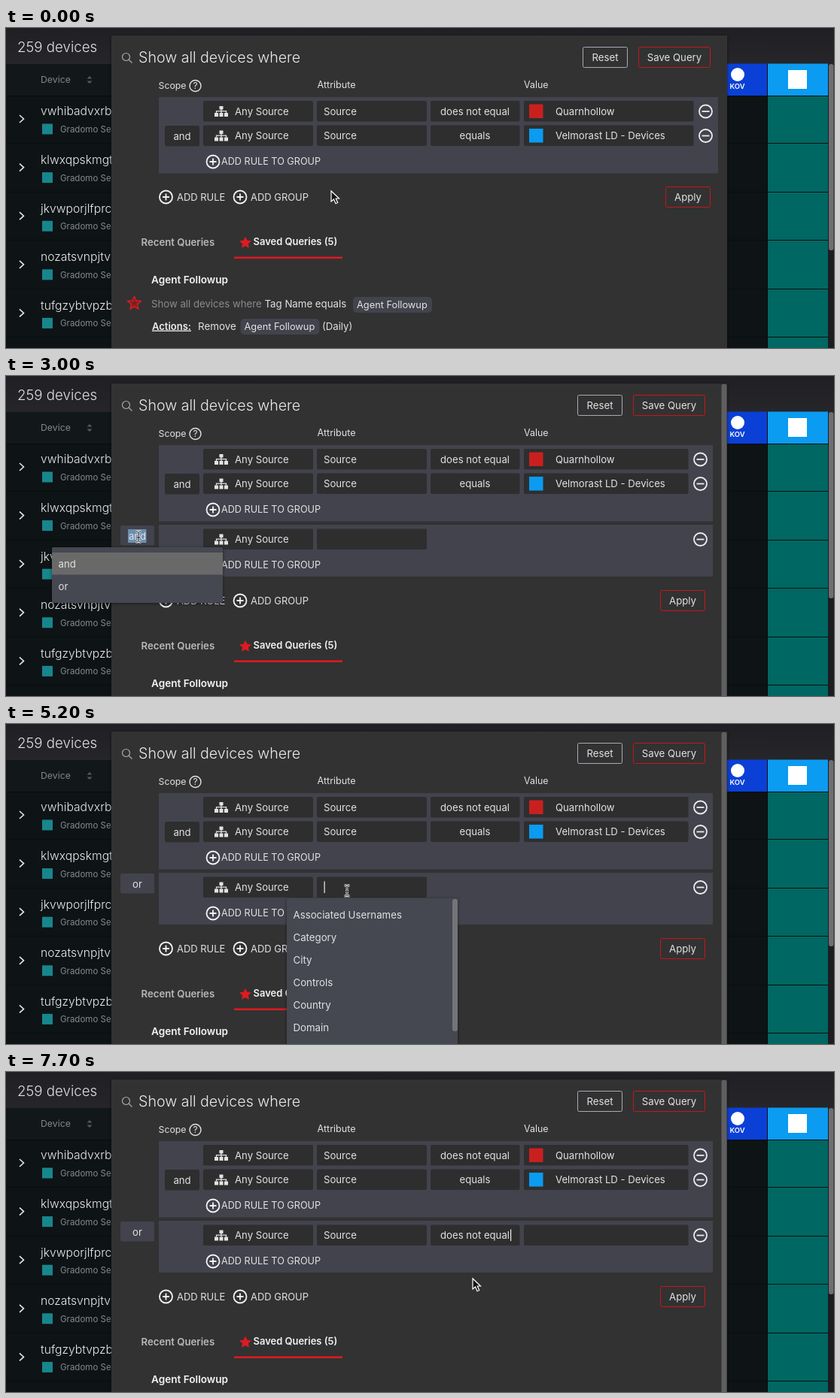
Animation, 1100 px wide and 426 px high, one loop 8 s. Source, as an HTML page:

```html
<!DOCTYPE html>
<html lang="en">
<head>
<meta charset="utf-8">
<title>Device query builder</title>
<style>
html, body { margin: 0; width: 100%; height: 100%; overflow: hidden; background: #0e1315; }
svg { display: block; width: 1100px; height: 426px; font-family: Inter, "Open Sans", sans-serif; }
text { white-space: pre; }
</style>
</head>
<body>
<svg id="stage" viewBox="0 0 1100 426"></svg>
<script>
const LOOP = 8000;
const GREY = '#42434d', FIELD = '#2e2e2f', LIGHT = '#e2e2e4', RED = '#c5161d';

// Each step holds until the next: time, cursor [shape, x, y], changes to the form
const steps = [
  [0, ['arrow', 432, 217], { group: false, hover: false, join: 'and', menu: '', attr: '', op: null, value: false, caret: '' }],
  [500, ['arrow', 412, 220], {}],
  [700, ['hand', 391, 232], { hover: true }],
  [1200, ['arrow', 389, 224], { hover: false, group: true }],
  [1400, ['arrow', 372, 222], {}],
  [1900, ['beam', 335, 217], {}],
  [2100, ['arrow', 254, 212], {}],
  [2300, ['arrow', 200, 210], {}],
  [2500, ['beam', 176, 214], {}],
  [3000, ['beam', 176, 214], { menu: 'join' }],
  [3500, ['hand', 177, 262], {}],
  [3700, ['hand', 178, 291], { menu: 'joinOr' }],
  [4200, ['arrow', 176, 283], { menu: '', join: 'or' }],
  [4700, ['arrow', 372, 230], {}],
  [5200, ['beam', 453, 222], { menu: 'attrs', caret: 'attr' }],
  [5700, ['beam', 453, 222], { menu: 'found', attr: 's' }],
  [5900, ['beam', 460, 226], { attr: 'sou' }],
  [6100, ['hand', 468, 254], { menu: 'foundHot' }],
  [6600, ['arrow', 466, 246], { menu: '', attr: 'Source', caret: '', op: '' }],
  [7100, ['beam', 622, 220], { caret: 'op', menu: 'ops' }],
  [7300, ['hand', 624, 258], { menu: 'opsFirst' }],
  [7500, ['hand', 625, 288], { menu: 'opsSecond' }],
  [7700, ['arrow', 620, 275], { menu: '', op: 'does not equal', value: true }]
];

const joins = ['and', 'or'], found = ['Source', 'Source Configuration'], ops = ['equals', 'does not equal'];
const attrs = ['Associated Usernames', 'Category', 'City', 'Controls', 'Country', 'Domain'];
// Centre, top, items, item under the cursor
const menus = {
  join: [174.5, 228, joins, 0],
  joinOr: [174.5, 228, joins, 1],
  attrs: [486.5, 232, attrs, -1],
  found: [486.5, 232, found, -1],
  foundHot: [486.5, 232, found, 0],
  ops: [623.5, 232, ops, -1],
  opsFirst: [623.5, 232, ops, 0],
  opsSecond: [623.5, 232, ops, 1]
};

const rect = (x, y, w, h, fill, more = '') =>
  `<rect x="${x}" y="${y}" width="${w}" height="${h}" fill="${fill}" ${more}/>`;
const path = (d, stroke, width = 1, fill = 'none') =>
  `<path d="${d}" stroke="${stroke}" stroke-width="${width}" fill="${fill}"/>`;
const ring = (x, y, r, stroke, width) =>
  `<circle cx="${x}" cy="${y}" r="${r}" fill="none" stroke="${stroke}" stroke-width="${width}"/>`;
// y is the middle of the capital letters
const text = (s, x, y, size = 13.15, fill = LIGHT, more = '') =>
  `<text x="${x}" y="${y + size * 0.35}" font-size="${size}" fill="${fill}" ${more}>${s}</text>`;
const mid = (s, x, y, size, fill) => text(s, x, y, size, fill, 'text-anchor="middle"');
const bold = (s, x, y, size, fill, more = '') => text(s, x, y, size, fill, 'font-weight="600" ' + more);
const thin = (s, x, y, size, fill) => text(s, x, y, size, fill, 'font-weight="300"');
const at = (x, y, body) => `<g transform="translate(${x} ${y})">${body}</g>`;

const plus = (x, y) => ring(x, y, 8.5, '#f4f4f4', 1.8) + path(`M${x - 4.5} ${y}h9M${x} ${y - 4.5}v9`, '#f4f4f4', 1.8);
const minus = (x, y) => ring(x, y, 8.5, '#ededed', 1.8) + path(`M${x - 5} ${y}h10`, '#ededed', 1.8);
const field = (x, y, w) => rect(x, y - 14, w, 27.5, FIELD, 'rx="2"');
const pill = (s, x, y) => rect(x, y - 10.5, 105, 21, GREY, 'rx="5"') + text(s, x + 5, y, 12.8);
const button = (s, x, y, w, stroke) =>
  rect(x + .5, y - 13.5, w, 27, 'none', `rx="2" stroke="${stroke}"`) + mid(s, x + w / 2 + .5, y + .5, 13.2);

function star(x, y, r, inner, fill, stroke) {
  const points = Array.from({ length: 10 }, (_, i) => {
    const a = i * Math.PI / 5, q = i % 2 ? inner : r;
    return `${(x + q * Math.sin(a)).toFixed(1)},${(y - q * Math.cos(a)).toFixed(1)}`;
  });
  return `<polygon points="${points.join(' ')}" fill="${fill}" stroke="${stroke}" stroke-width="1.6"/>`;
}

const sitemap = (x, y) => at(x, y,
  rect(6.5, 0, 5, 4.5, LIGHT) + [0, 6.5, 13].map(i => rect(i, 9, 5, 5, LIGHT)).join('') +
  path('M9 4v5M2.5 9V6.7h13V9', LIGHT, 1.3));

function backdrop() {
  let s = rect(0, 0, 1100, 426, '#0e1315') + rect(0, 0, 1100, 48, 'url(#top)') +
    rect(0, 48, 1092, 42, '#12171a') + rect(1092, 48, 8, 378, '#1c1d20') +
    rect(1093, 48, 6.5, 248, '#6e6f72', 'rx="3"') +
    thin('259 devices', 15, 25, 18.7, '#e2e2e4') + text('Device', 46, 69, 12.3, '#85878b') +
    path('M107.5 67.5l3.5-3.5 3.5 3.5zM107.5 70.5l3.5 3.5 3.5-3.5z', 'none', 0, '#565a5e') +
    rect(940, 47.5, 71.5, 42.5, '#0a40d6') + rect(1012, 47.5, 80, 42.5, '#0b9bf0') +
    '<circle cx="972" cy="62" r="9" fill="#fff"/>' + bold('KOV', 961.5, 78, 9.5, '#fff') +
    rect(1039, 56, 25, 25, '#fff') + rect(1012, 91, 80, 335, '#006762');
  ['vwhibadvxrbq', 'klwxqpskmgt', 'jkvwporjlfprc', 'nozatsvnpjtvk', 'tufgzybtvpzb'].forEach((name, i) => {
    const y = 64.6 * i;
    s += thin(name, 46, 111 + y, 15.7, '#ececee') + text('Gradomo Server', 72, 135 + y, 11.5, '#85898c') +
      rect(48, 127.5 + y, 14, 14, '#17878d') + path(`M18 ${116 + y}l5.5 5-5.5 5`, '#e4e4e4', 1.6) +
      rect(0, 153 + Math.round(y), 1092, 1, '#06100f');
  });
  return s + rect(0, 90, 1092, 1, '#080b0c') + rect(1011, 48, 1, 378, '#080b0c');
}

function rule(y, shift, attr, op, value, tint) {
  return field(262, y, 146) + sitemap(277, y - 7) + text('Any Source', 304, y) +
    field(413, y, 146) + text(attr, 422, y) +
    (op === null ? '' : field(564, y, 118.5) + mid(op, 623, y)) +
    (value === null ? '' : field(688, y, 225.5 - shift) + text(value, 730, y)) +
    (tint ? rect(695, y - 9.5, 18.5, 18.5, tint) : '') + minus(929.5 - shift, y);
}

function menu(name) {
  const [cx, y, items, hot] = menus[name];
  const x = cx - 113.5, long = items.length > 2;
  let s = rect(x, y, 227, long ? 210 : 74, '#454751', 'rx="2" filter="url(#shade)"');
  items.forEach((item, i) => {
    const row = y + 7 + 30 * i;
    if (items === joins && !i) s += rect(x, row, 227, 29.5, '#696969');
    else if (i === hot) s += rect(x, row, 227, 30, '#4d4f5a');
    s += text(item, x + 8.5, row + 15, 13.25);
  });
  return s + (long ? rect(x + 220, y + 1, 7, 176, '#73747a', 'rx="3"') : '');
}

function dialog(f) {
  const shift = f.group ? 7 : 0, drop = f.group ? 74 : 0;
  const wide = 743 - shift;
  let s = rect(140, 10, 818, 430, '#333', 'filter="url(#shade)"') +
    (f.group ? rect(950.5, 11, 7, 430, '#5f5f60', 'rx="2"') : '') +
    ring(159.5, 38.5, 5, '#a5a5a8', 1.2) + path('M163 42l4.5 4.5', '#a5a5a8', 1.2) +
    thin('Show all devices where', 176, 39.5, 19.6, '#ececee') +
    button('Reset', 766 - shift, 39, 59, '#aaaab8') + button('Save Query', 840 - shift, 39, 95, RED) +
    text('Scope', 202.5, 77, 12.3) + ring(251.5, 77, 7.5, LIGHT, 1.4) + mid('?', 251.5, 77, 12) +
    text('Attribute', 413.5, 75.5, 12.6) + text('Value', 688, 75.5, 12.4) +
    rect(203, 92, wide, 101.5, GREY) +
    rule(111, shift, 'Source', 'does not equal', 'Quarnhollow', '#c9201f') +
    rule(143.5, shift, 'Source', 'equals', 'Velmorast LD - Devices', '#0b9bf0') +
    field(211, 144, 46) + mid('and', 234, 144) +
    plus(275, 178) + text('ADD RULE TO GROUP', 286, 177.5, 12.65);

  if (f.group) {
    s += rect(203, 198, wide, 69, GREY) + rect(152, 199, 45, 26.5, GREY, 'rx="2"') +
      (f.menu.startsWith('join') ? rect(162, 204, 24.5, 18, '#6c8fb0') : '') + mid(f.join, 174.5, 213) +
      rule(217.5, shift, f.attr, f.op, f.value ? '' : null) +
      plus(275, 252) + text('ADD RULE TO GROUP', 286, 251.5, 12.65);
    if (f.caret) {
      const x = f.caret === 'op' ? (f.op ? 670 : 623) : 422.5 + 7.6 * f.attr.length;
      s += rect(x, 209.5, 1.2, 15.5, '#eee');
    }
  }

  return s + at(0, drop,
    (f.hover ? rect(295.5, 211, 111.5, 29, GREY, 'rx="2"') : '') +
    plus(212.5, 225) + text('ADD RULE', 227, 225, 12.95) + plus(311, 225) + text('ADD GROUP', 325, 225, 12.95) +
    button('Apply', 876 - shift, 225, 59, RED) +
    bold('Recent Queries', 179.5, 285.5, 13.2, '#b9b9bc') +
    star(318, 286, 6.5, 3.3, '#dd1b21', '#dd1b21') + bold('Saved Queries (5)', 328.5, 284.5, 12.95, '#f2f2f2') +
    rect(303, 304.5, 144, 2.5, '#e0191f') + bold('Agent Followup', 193, 335, 13.6, '#f4f4f4') +
    star(170.5, 366.5, 9, 4.2, 'none', '#dd1b21') + star(170.5, 366.5, 4, 2, 'none', '#a3181c') +
    text('Show all devices where', 193, 367.5, 13.2, '#8b8b90') + text('Tag Name equals', 343.5, 367.5, 13.25) +
    pill('Agent Followup', 461, 368.5) +
    bold('Actions:', 194, 397, 13, '#eee', 'text-decoration="underline"') + text('Remove', 255, 397, 13.4) +
    pill('Agent Followup', 311.5, 397.5) + text('(Daily)', 420, 397));
}

const cursors = {
  arrow: path('M0 0v14l3.5-3 2.5 5.7 2.7-1.2-2.5-5.5h4.3z', '#fff', 1.2, '#151515'),
  hand: path('M-3.5-7c1.5-1.2 2.5 0 2.5 1v3.5c1-1 2.3-.5 2.5.5 1-.7 2-.2 2.2.7 1-.4 1.8.2 1.8 1.3 0 3-.5 4-1.5 6v2h-6.5v-2l-4.2-6c-.2-1.5 1.4-1.8 2.5-.5z', '#222', 1, '#fff') +
    path('M-.3 3v3M1.5 3v3M3.3 3v3', '#222', .8),
  beam: ['#f4f4f4', '#111'].map((c, i) =>
    path('M-3.5-7h2L0-5.5l1.5-1.5h2M0-5.5v11M-3.5 7h2L0 5.5 1.5 7h2M-2 1h4', c, i ? 1 : 2.8)).join('')
};

const defs = `<defs>
  <linearGradient id="top" x2="0" y2="1"><stop stop-color="#202024"/><stop offset="1" stop-color="#26262a"/></linearGradient>
  <filter id="shade" x="-10%" y="-10%" width="120%" height="125%"><feDropShadow dx="0" dy="1" stdDeviation="2" flood-opacity=".5"/></filter>
</defs>`;

const stage = document.getElementById('stage');
const back = defs + backdrop();
let shown = -1;

function draw() {
  const t = performance.now() % LOOP;
  const now = steps.findLastIndex(step => step[0] <= t);
  if (now !== shown) {
    shown = now;
    const form = Object.assign({}, ...steps.slice(0, now + 1).map(step => step[2]));
    const [shape, x, y] = steps[now][1];
    stage.innerHTML = back + dialog(form) + (form.menu && menu(form.menu)) + at(x, y, cursors[shape]);
  }
  requestAnimationFrame(draw);
}
draw();
</script>
</body>
</html>
```
